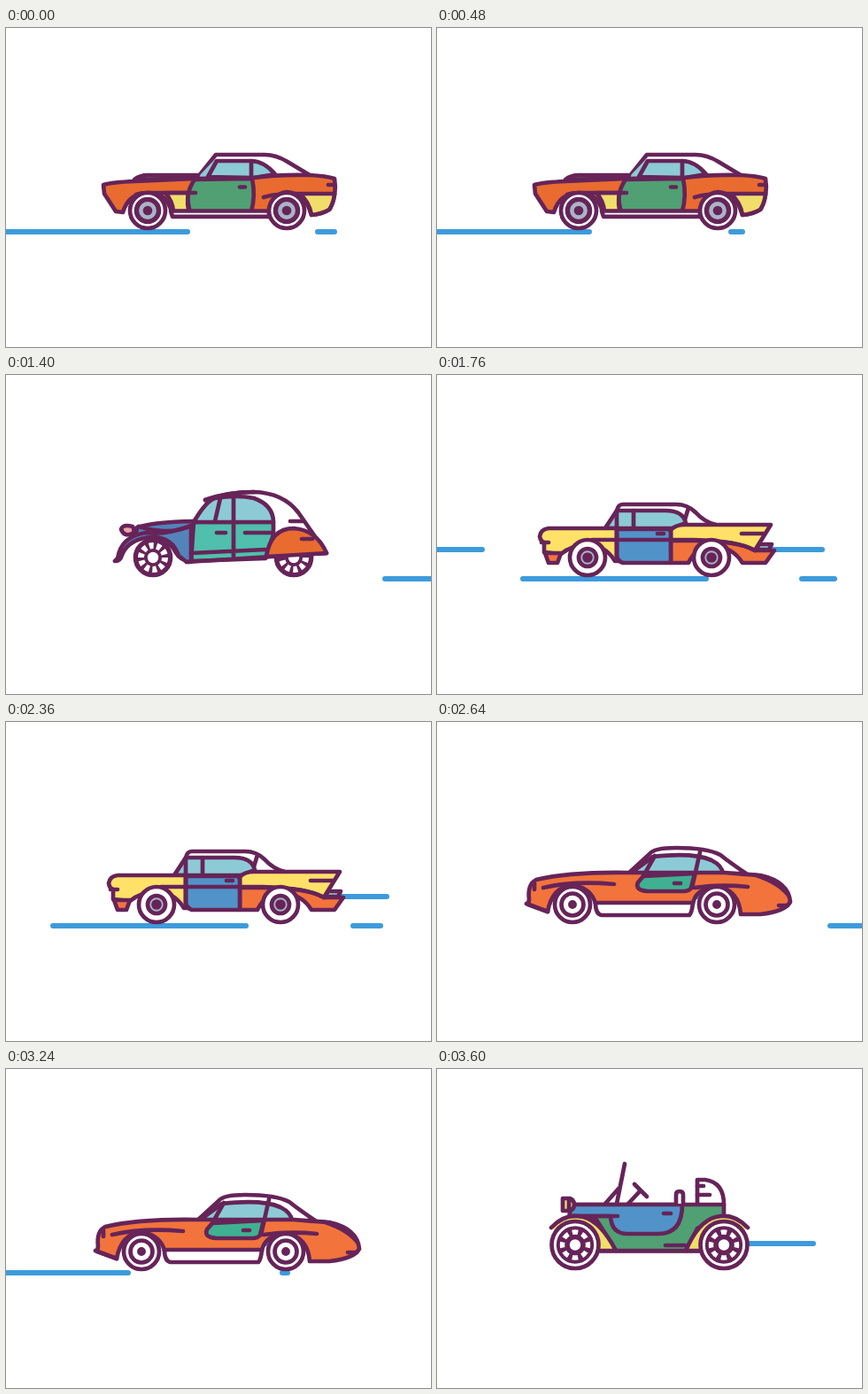
An HTML page without scripts that plays this animation: 480 px wide and 360 px high, repeating every 3.64 s.

```html
<!DOCTYPE html>
<html lang="en">
<head>
<meta charset="utf-8">
<title>Passing cars</title>
<style>
  @property --u { syntax: "<number>"; inherits: true; initial-value: 3; }

  html, body { margin: 0; width: 100%; height: 100%; overflow: hidden; background: #fff; }
  .stage { position: relative; width: 480px; height: 360px; overflow: hidden; animation: rush 3640ms infinite; }

  /* Speed lines: both ends are linear in --u, which counts down once per sweep. */
  .line { position: absolute; height: 6px; border-radius: 3px; background: #3d9bdb; }
  .road { top: 227px; }
  .air { top: 194px; animation: appear 3640ms step-end infinite; }
  .road.long { left: calc((94 - 44 * var(--u)) * 1px); width: calc((212.5 + 11 * var(--u)) * 1px); }
  .road.short { left: calc((409 - 20 * var(--u)) * 1px); width: calc((42.5 - 6 * var(--u)) * 1px); }
  .air.long { left: calc((-150 - 50 * var(--u)) * 1px); width: min((204 + 12.6 * var(--u)) * 1px, (204 - 10 * var(--u)) * 1px); }
  .air.short { left: calc((330 - 20 * var(--u)) * 1px); width: min((108 + 15 * var(--u)) * 1px, (125 + 6.3 * var(--u)) * 1px); }

  @keyframes rush {
    0% { --u: 3; animation-timing-function: steps(9); }
    9.88% { --u: -11.25; }
    9.89% { --u: 8.08; animation-timing-function: steps(14); }
    25.26% { --u: -10.96; }
    25.27% { --u: 9.17; animation-timing-function: steps(14); }
    40.64% { --u: -10.3; }
    40.65% { --u: 9.31; animation-timing-function: steps(15); }
    57.13% { --u: -10.64; }
    57.14% { --u: 9.89; animation-timing-function: steps(16); }
    74.71% { --u: -10.43; }
    74.72% { --u: 10.4; animation-timing-function: steps(12); }
    87.9% { --u: -6.4; }
    87.91% { --u: 6.67; animation-timing-function: steps(11); }
    100% { --u: -11.67; }
  }
  @keyframes appear { 0% { opacity: 0; } 15.38% { opacity: 1; } }

  /* The cars stand side by side, one stage width apart. */
  svg { position: absolute; left: 0; top: 0; overflow: hidden; }
  .cars { animation: swap 3640ms step-end infinite; }
  @keyframes swap {
    0% { transform: translateX(0); }
    15.38% { transform: translateX(-480px); }
    40.65% { transform: translateX(-960px); }
    65.93% { transform: translateX(-1440px); }
    91.2% { transform: translateX(-1920px); }
  }

  .cars, .wheel { fill: none; stroke: #662458; stroke-width: 4.7; stroke-linecap: round; stroke-linejoin: round; }
  .white { fill: #fff; }
  .orange { fill: #e96b30; }
  .coral { fill: #f2743c; }
  .yellow { fill: #ffe168; }
  .straw { fill: #f1dd6a; }
  .green { fill: #50a074; }
  .teal { fill: #50bfad; }
  .mint { fill: #3fb190; }
  .glass { fill: #8ccbd5; }
  .blue { fill: #5193c9; }
  .steel { fill: #5284ba; }
  .grey { fill: #a9b4c6; }
  .solid { fill: #662458; }
  .spokes { stroke: #fff; stroke-linecap: butt; stroke-dasharray: .58 .42; }
</style>
</head>
<body>
<div class="stage">
  <div class="line road long"></div>
  <div class="line road short"></div>
  <div class="line air long"></div>
  <div class="line air short"></div>

  <svg width="480" height="360" viewBox="0 0 480 360">
    <defs>
      <g id="disc" class="wheel">
        <circle r="20" class="white"/>
        <circle r="12.6" class="grey" stroke-width="5.4"/>
        <circle r="3" class="solid"/>
      </g>
      <g id="whitewall" class="wheel">
        <circle r="20" class="white"/>
        <circle r="10" class="grey"/>
        <circle r="3.5" class="solid"/>
      </g>
      <g id="rings" class="wheel">
        <circle r="20" class="white"/>
        <circle r="12.5"/>
        <circle r="2.6" class="solid"/>
      </g>
      <g id="spoked" class="wheel">
        <circle r="20" class="solid"/>
        <circle r="13.5" class="spokes" stroke-width="7" pathLength="10"/>
        <circle r="6.2" class="white" stroke="none"/>
      </g>
      <g id="wire" class="wheel">
        <circle r="26.500" class="white"/>
        <circle r="18.800" class="solid"/>
        <circle r="14.500" class="spokes" stroke-width="5.4" pathLength="8" stroke-dashoffset=".29"/>
        <circle r="6.2" class="white" stroke="none"/>
      </g>
    </defs>

    <g class="cars">
      <!-- fastback -->
      <g>
        <path class="white" d="M217 168L237 143H292Q305 143 318 151L343 166L280 171Z"/>
        <path class="glass" stroke="none" d="M217 168L236 148L240 170Z"/>
        <path class="glass" d="M228 168L238 150H277Q291 150 304 165L280 169Z"/>
        <path class="green" d="M145 171Q151 166 160 166H217L213 170Z"/>
        <path class="orange" d="M110 177Q120 174 145 173L213 170L280 169Q308 165 343 166Q362 167 371 170Q374 188 366 204Q358 210 345 211L341 200Q333 186 317 185Q301 186 297 211H188Q184 192 170 187Q140 182 132 208L124 207L111 187Z"/>
        <path class="straw" d="M180 186H206Q204 200 207 207H189Q188 195 180 186ZM331 187H371Q370 198 365 205Q356 210 345 211Q342 195 331 187Z"/>
        <path class="green" d="M213 171L278 170Q282 190 277 207H208Q201 188 213 171Z"/>
        <path class="white" d="M186 206.500H297V212.800H188Z"/>
        <path d="M277 150V170M147 188Q152 186 160 186H214M291 191Q303 187 330 187M264 179.500H270M364 177H371"/>
        <use href="#disc" x="160" y="206"/>
        <use href="#disc" x="317" y="206"/>
      </g>

      <!-- round economy car -->
      <g transform="translate(480)">
        <path class="white" d="M225 141Q250 132 280 132Q313 133 330 155L362 201L294 205L212 166L232 139Z"/>
        <path class="teal" d="M209 166H302V180L293 207L209 210Z"/>
        <path class="glass" d="M212 166Q226 142 236 139Q262 135 280 139Q302 147 302 166Z"/>
        <path class="steel" d="M148 172Q165 166 212 165L209 210Q197 210 191 199Q182 180 146 184Z"/>
        <path class="steel" d="M123 210Q129 210 131 203Q139 184 166 183Q188 183 195 204L204 211H209V170Q180 181 158 178Q130 182 126 207Z"/>
        <path d="M150 171Q185 182 212 169M225 141Q250 132 280 132M242 139L236 165M257 138V207M238 178H248M270 178H300M209 201L293 197M204 211L362 201M321 165H335"/>
        <path fill="#e8a6ac" d="M130 174Q132 168 143 171Q146 176 143 179Q133 183 130 174Z"/>
        <use href="#spoked" x="166" y="206"/>
        <use href="#spoked" x="325" y="206"/>
        <path class="orange" d="M294 205Q299 173 325 173Q351 175 362 201Z"/>
        <path d="M334 185H346"/>
      </g>

      <!-- finned coupe -->
      <g transform="translate(960)">
        <path class="white" d="M190 173L203 154Q204 146 210 146H270Q283 146 292 155Q302 166 315 169L266 174Z"/>
        <path class="glass" d="M190 173L203 153H258Q278 153 281 167L266 173Z"/>
        <path class="yellow" d="M203 173H126Q117 174 116 182Q117 188 121 189V200L140 202Q152 192 170 191Q190 192 201 210H264V175Q269 169 280 169H377L359 198H264Z"/>
        <path class="coral" d="M122 201H140L136 212H126Z"/>
        <path class="glass" d="M364 191H378L375 197H360Z"/>
        <path class="coral" d="M264 187H290Q340 187 359 198H381L371 212H345Q334 194 310 192Q292 195 284 212H264Z"/>
        <path class="blue" d="M203 174H262L264 177V212H210Q204 210 203 204Z"/>
        <path d="M203 153V205M222 153V173M284 150L280 163M118 189H126M175 186H290Q340 187 359 198M249 179H256M344 179H369"/>
        <use href="#whitewall" x="170" y="206"/>
        <use href="#whitewall" x="310" y="206"/>
      </g>

      <!-- long-nosed coupe -->
      <g transform="translate(1440)">
        <path class="white" d="M216 171L240 149Q245 142 270 142Q305 142 320 150Q330 158 349 171Z"/>
        <path class="glass" d="M218 171L244 152Q290 147 310 156Q322 162 323 171Z"/>
        <path class="coral" d="M104 200Q102 183 112 178Q150 169 215 170H325Q345 172 365 173Q397 180 399 203Q393 214 365 217H343Q341 190 316 185Q292 188 289 205H179Q174 187 153 184Q130 186 125 214L103 206Z"/>
        <path class="white" d="M179 204H289Q288 215 285 218H186Q179 217 179 204Z"/>
        <path class="mint" d="M233 174L291 171L287 187Q285 191 278 191H238Q223 190 227 181Z"/>
        <path class="solid" stroke-width="3" d="M350 171Q388 172 398 198Q384 179 350 171Z"/>
        <path d="M246 151L233 174M297 147L288 187M120 187Q155 179 200 183M291 187Q320 183 351 186M268 182H275M386 207H396M101 205L125 214M110 182V189"/>
        <use href="#rings" x="153" y="206"/>
        <use href="#rings" x="316" y="206"/>
      </g>

      <!-- open roadster -->
      <g transform="translate(1920)">
        <path class="white" d="M294 153V125H303Q324 128 324 153"/>
        <path class="green" d="M150 153H324V166L294 180L281 205H202L180 170L150 166Z"/>
        <path class="blue" d="M150 153H277C277 172 270 186 250 186H215Q197 186 196 166H150Z"/>
        <path class="straw" d="M129 179Q145 162 165 167Q185 172 202 205H160M351 179Q335 162 315 167Q295 172 281 205H320"/>
        <path d="M150 166H204M212 107L203 152M205 135L190 152M223 130L237 144M229 138L216 152M294 132H301M294 142H308M256 163H264M258 199H280M184 205.500H296"/>
        <path class="white" d="M270 152V142Q270 138 274 138Q278 138 278 142V152"/>
        <path class="straw" d="M142 146H150Q155 148 155 153Q155 158 150 160H142ZM149 147V159"/>
        <use href="#wire" x="156" y="198.500"/>
        <use href="#wire" x="324" y="198.500"/>
      </g>
    </g>
  </svg>
</div>
</body>
</html>
```
